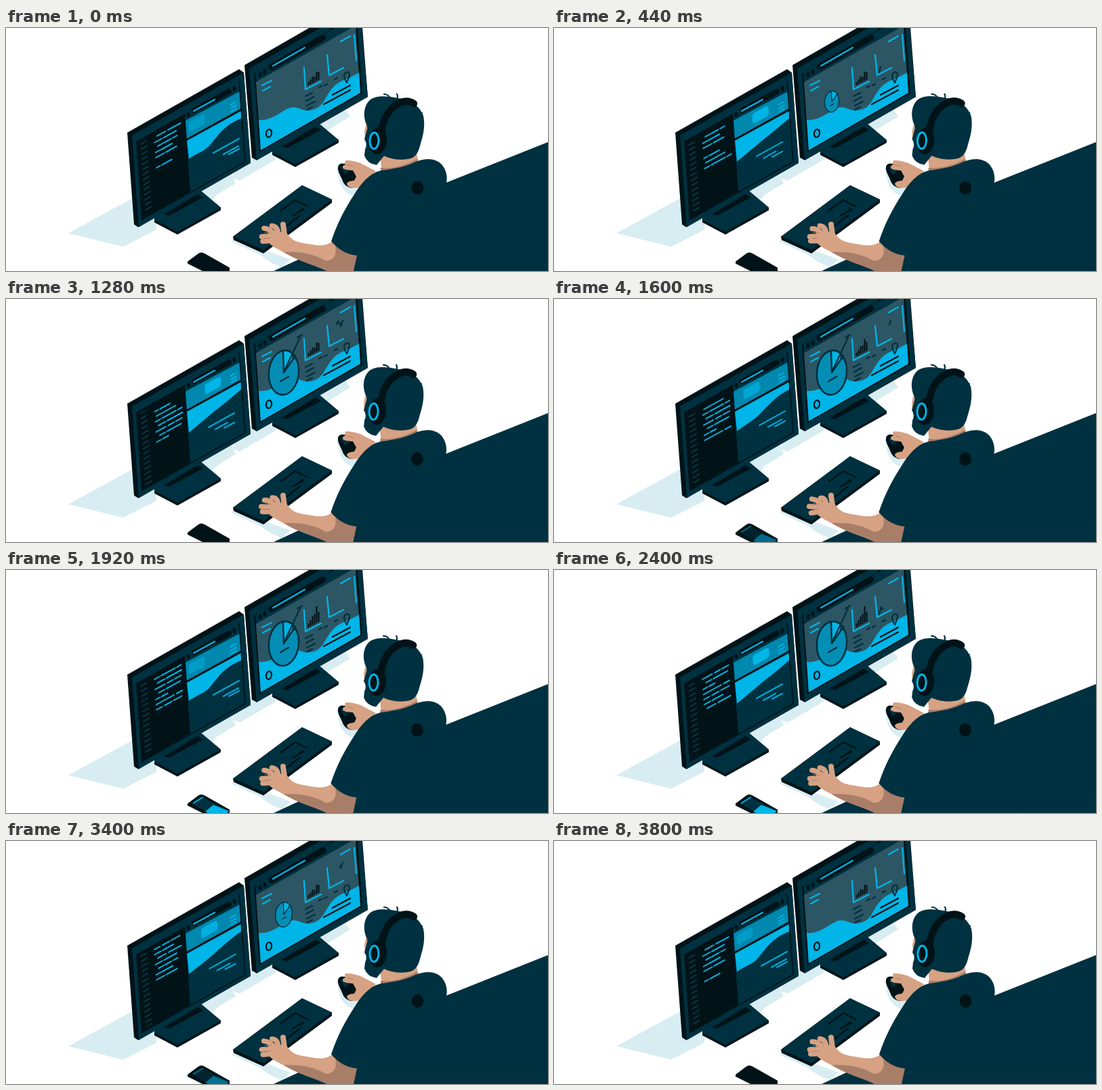
An HTML page with a canvas that plays this animation: 800x360 px, repeating every 3840 ms.

```html
<!DOCTYPE html>
<html lang="en">
<head>
<meta charset="utf-8">
<title>Developer at work</title>
<style>
html, body { margin: 0; width: 100%; height: 100%; overflow: hidden; background: #fff; }
canvas { display: block; }
</style>
</head>
<body>
<canvas id="stage" width="800" height="360"></canvas>
<script>
const ctx = document.getElementById('stage').getContext('2d');
const LOOP = 3840, HALF = LOOP / 2;
const NAVY = '#003140', INK = '#021318', CYAN = '#00b5e7', BLUE = '#0088ae',
      SLATE = '#2c5664', SHADOW = '#d8edf2', SKIN = '#d6a283', SHADE = '#a97e69', GUTTER = '#0a3947';

const lerp = (a, b, k) => a + (b - a) * k;
const ramp = (t, a, b) => {
  const k = Math.min(1, Math.max(0, (t - a) / (b - a)));
  return k * k * (3 - 2 * k);
};
const bump = (t, a, b, c, d) => ramp(t, a, b) - ramp(t, c, d);

// Piecewise linear value through [time, value] keys.
function track(t, keys) {
  if (t <= keys[0][0]) return keys[0][1];
  for (let i = 1; i < keys.length; i++) {
    const [a, x] = keys[i - 1], [b, y] = keys[i];
    if (t < b) return lerp(x, y, (t - a) / (b - a));
  }
  return keys[keys.length - 1][1];
}

function fill(color, d) {
  ctx.fillStyle = color;
  ctx.fill(new Path2D(d));
}
function stroke(color, width, d) {
  ctx.strokeStyle = color;
  ctx.lineWidth = width;
  ctx.stroke(new Path2D(d));
}
function oval(x, y, rx, ry, tilt = 0) {
  ctx.beginPath();
  ctx.ellipse(x, y, rx, ry, tilt, 0, Math.PI * 2);
}
function disc(color, x, y, rx, ry = rx, tilt = 0) {
  oval(x, y, rx, ry, tilt);
  ctx.fillStyle = color;
  ctx.fill();
}
function ring(color, width, x, y, rx, ry, tilt = 0) {
  oval(x, y, rx, ry, tilt);
  ctx.strokeStyle = color;
  ctx.lineWidth = width;
  ctx.stroke();
}
function group(draw, dx = 0, dy = 0) {
  ctx.save();
  ctx.translate(dx, dy);
  draw();
  ctx.restore();
}

function drawDesk() {
  fill(SHADOW, 'M92 304L187 252L222 272V299L173 324Z');
  fill(SHADOW, 'M283 235L330 212L339 230L311 247L300 262Z');
  fill(SHADOW, 'M333 222L350 190L400 165L398 195L345 226Z');
  fill(SHADOW, 'M456 140L497 115L508 131L474 152Z');
  fill(SHADOW, 'M332 316L340 311L385 330L420 343L408 354Q392 350 375 336Z');
  fill(NAVY, 'M395 360L492 315L640 233L800 169V360Z');
}

// The far edge runs on behind the monitor.
function drawStand(x, y) {
  group(() => {
    fill(INK, 'M0 0L60 -50L98 -18V-14L34 22L0 4Z');
    fill(NAVY, 'M0 0V-10L60 -50L98 -18L34 18Z');
    fill(INK, 'M14 -8L64 -38L72 -33L22 -6Z');
  }, x, y);
}

const codeRows = [
  [4, 12, 20, 18], [0, 10, 13, 18], [4, 7, 13, 10, 26, 6], [0, 6, 8, 16], [0, 12, 15, 15],
  [], [0, 5, 8, 14], [2, 28], [0, 7, 10, 20, 33, 6], [4, 10, 17, 22],
  [0, 14, 18, 8, 29, 9], [5, 8, 16, 20], [0, 6, 9, 8], [0, 26, 30, 8], [0, 8, 12, 10, 25, 12], [0, 9, 12, 15]
];

function drawCode(t) {
  const pitch = 7.5, total = codeRows.length * pitch, scroll = t / LOOP * total;
  ctx.save();
  ctx.transform(1, -.55, .07, 1, 219, 158);
  ctx.beginPath();
  ctx.rect(-2, 0, 46, 55);
  ctx.clip();
  codeRows.forEach((row, i) => {
    const y = (i * pitch + 4 - scroll + total) % total;
    for (let j = 0; j < row.length; j += 2)
      stroke(j % 4 ? CYAN : '#18a0c4', 2.3, `M${row[j]} ${y}h${row[j + 1]}`);
  });
  ctx.restore();

  ctx.save();
  ctx.transform(1, -.55, .07, 1, 199, 169);
  ctx.beginPath();
  ctx.rect(-2, 0, 14, 107);
  ctx.clip();
  for (let i = 0; i < 16; i++) stroke(GUTTER, 2, `M0 ${i * pitch + 3 - scroll % pitch}h8`);
  ctx.restore();
}

function drawSite(t) {
  const p = t % HALF, k = bump(p, 80, 480, 1330, 1820);
  const mix = (a, b) => lerp(a, b, k).toFixed(2);
  fill(NAVY, 'M264 122L344 77L353 197L272 242Z');
  stroke(INK, 8, 'M278 122L329 94');
  stroke(CYAN, 2.2, 'M277 123L308 106');
  disc(INK, 269, 128, 2.5, 3.5);
  disc(INK, 337, 90, 2.5, 4);
  fill(BLUE, 'M265 137L345 94L347 119L267 164Z');

  ctx.save();
  ctx.globalAlpha = lerp(.45, 1, k);
  ctx.transform(1, -.55, .06, 1, lerp(269, 293, k), lerp(140, 127, k));
  ctx.beginPath();
  ctx.roundRect(0, 0, 24, 15, 4);
  ctx.fillStyle = CYAN;
  ctx.fill();
  ctx.restore();

  stroke(CYAN, 1.8, 'M331 114l8 -4.5M332 119l8 -4.5M332 124l8 -4.5');
  fill(CYAN, `M267 167L347 123V134C${mix(322, 334)} ${mix(144, 145)} ${mix(315, 321)} ${mix(157, 156)} ${mix(303, 308)} ${mix(171, 166)}C${mix(294, 296)} ${mix(183, 176)} ${mix(285, 283)} ${mix(183, 187)} 270 ${mix(194, 198)}Z`);
  stroke(INK, 2.5, 'M267 165L347 121');
  stroke('#00a5d2', 2.2, `M${mix(306, 299)} ${mix(185, 190)}l38 -21M${mix(321, 309)} ${mix(187, 193)}l${mix(22, 18)} ${mix(-12, -10)}M${mix(329, 322)} ${mix(187, 191)}l15 -8`);
}

function drawLeftMonitor(t) {
  drawStand(219, 284);
  fill(INK, 'M179 155L344 61L351 66L361 200L195 295L189 291Z');
  fill(NAVY, 'M186 159L351 66L361 200L196 295Z');
  fill(INK, 'M192 168L264 127L272 242L200 284Z');
  drawCode(t);
  drawSite(t);
  stroke(INK, 1.5, 'M344 79L353 198L200 284');
}

function drawPie(t) {
  const size = bump(t, 150, 750, 3180, 3660);
  if (size > .01) {
    ctx.save();
    ctx.translate(410, 109);
    ctx.scale(size, size);
    disc('#058eb5', 0, 0, 22, 33, .1);
    fill(CYAN, 'M0 0L-1 -32Q9 -33 17 -25Z');
    ring(NAVY, 2.6, 0, 0, 22, 33, .1);
    stroke(NAVY, 2.5, 'M-1 -32L0 0L17 -25M-5 13L7 6');
    ctx.restore();
  }
  const reach = bump(t, 680, 1020, 2620, 3060);
  if (reach > .01) {
    stroke(NAVY, 2.3, `M410 108L${lerp(410, 434, reach)} ${lerp(108, 57, reach)}`);
    if (reach > .75) stroke(NAVY, 2.2, 'M430 57L437 53');
  }
  if (size > .8) ring(NAVY, 1.6, 425, 86, 2, 3);
}

function drawBars(t) {
  const k = bump(t, 1300, 1920, 2420, 2960);
  const low = [5, 7, 10, 8, 14, 12], high = [6, 9, 13, 15, 25, 15];
  ctx.lineCap = 'butt';
  low.forEach((h, i) => {
    stroke(INK, 2.1, `M${446.5 + i * 3} ${85 - i * 1.6}v${-lerp(h, high[i], k)}`);
  });
  ctx.lineCap = 'round';
}

function drawTrend(t) {
  const p = t % HALF;
  const head = track(p, [[400, 0], [480, 15], [560, 20], [880, 43], [1120, 55], [1280, 63]]);
  const tail = track(p, [[760, 0], [880, 5], [1120, 27], [1280, 41], [1720, 63]]);
  if (head - tail < .2) return;
  ctx.setLineDash([head - tail, 200]);
  ctx.lineDashOffset = -tail;
  stroke(NAVY, 2.3, 'M480 65L483 55L487 61L488.5 35L491 33L494 40L497 32');
  ctx.setLineDash([]);
}

function drawRightMonitor(t) {
  drawStand(393, 184);
  fill(INK, 'M352 55L449 -1H526L534 102L370 196L363 192Z');
  fill(NAVY, 'M359 60L464 0H525L534 102L370 196Z');
  fill(INK, 'M366 67L478 3V0H519L526 97L374 184Z');
  fill(NAVY, 'M368 66L485 0H516L517 2L370 84Z');
  stroke(INK, 9, 'M392 58L468 14');
  stroke(CYAN, 2.2, 'M394 56L441 29');
  disc(INK, 375, 69, 2.5, 3.8);
  disc(INK, 382, 65, 2.5, 3.8);
  fill(SLATE, 'M369 80L510 0H516L523 96L376 181Z');
  fill(CYAN, 'M373 136C392 138 403 125 417 119C431 114 435 124 449 122C469 119 470 102 481 90C491 77 506 76 521 66L523 96L376 181Z');
  stroke(CYAN, 2.2, 'M378 85L392 78M379 93L390 87M494 20L508 12M514 10L517 48');
  stroke(CYAN, 2.3, 'M440 59L442 91L465 79M474 40L477 70L498 59');
  stroke(NAVY, 2.4, 'M442 101l10 -5M443 108l11 -6M444 115l12 -6M444 121l8 -4');
  stroke(NAVY, 2.3, 'M462 88l4 -2M470 85l4 -2M485 76l4 -2');
  stroke(INK, 2.2, 'M482 99L508 85M469 113L508 92');
  ring(INK, 2.2, 388, 156, 4, 6, .15);
  drawBars(t);
  drawTrend(t);
  drawPie(t);
  stroke(NAVY, 2.2, 'M503 81C500 76 499 73 499 70C500 65 507 63 507 69C507 74 504 77 503 81Z');
}

function drawKeyboard() {
  fill(INK, 'M335 309L437 233L481 254V259L380 334L336 314Z');
  fill(NAVY, 'M336 309L437 233L481 254L380 329Z');
  stroke(INK, 2.5, 'M406 270L427 255L445 264M423 278L439 269M421 287L434 278M430 274L438 268M411 295L422 288');
}

function drawPhone(t) {
  fill(INK, 'M268 346L284 334Q288 331 293 334L330 355V360H290L268 349Z');
  const glow = bump(t, 1450, 1750, 3220, 3600);
  if (glow <= 0) return;
  ctx.globalAlpha = glow;
  fill(NAVY, 'M274 346L289 336L327 356L321 360H300Z');
  fill(CYAN, 'M294 358L306 348L329 357L326 360H298Z');
  stroke(CYAN, 2, 'M277 345L290 337');
  ctx.globalAlpha = 1;
}

function drawMouseHand(t) {
  const reach = bump(t, 440, 840, 900, 1250);
  fill(SHADOW, 'M488 208L493 230Q500 246 514 249L523 234L505 205Z');
  group(() => {
    fill(INK, 'M490 206C491 199 501 199 508 206C517 214 521 224 516 235C511 240 500 235 497 227C495 220 489 213 490 206Z');
    fill(NAVY, 'M494 207C497 203 503 207 507 212L500 217Z');
    fill(SKIN, 'M502 198C505 194 515 198 523 200L546 212L525 236L514 237Q505 237 503 231Q503 227 514 226L517 220L512 211L502 210Q497 208 500 204Z');
    stroke(SKIN, 6, 'M503 199L519 205M500 206L513 208');
    stroke(SHADE, 1, 'M504 203L512 205');
  }, 4 * reach, -reach);
}

function drawTypingArm(t) {
  fill(SKIN, 'M388 300L414 303C421 315 429 317 441 319C458 322 470 325 482 316L519 338L515 360H474C452 349 430 344 411 333C399 326 389 323 384 312Z');
  fill(SHADE, 'M410 332C436 331 455 335 472 345Q490 344 486 322L519 338L515 360H474C452 350 430 345 410 332Z');
  const tap = n => 1.1 * Math.sin(Math.PI * 2 * (t / 480 + n * .27));
  const tips = [[379, 316], [377, 308], [381, 297], [393, 294]];
  tips.forEach(([x, y], i) => stroke(SKIN, 7.5, `M${x + tap(i) * .5} ${y + tap(i)}Q${x + 10} ${y} 402 312`));
  stroke(SKIN, 8, 'M409 291L411 307L402 314');
  stroke(SHADE, 1, 'M382 303L391 304M381 312L390 311');
}

function drawBody() {
  fill(SKIN, 'M552 188L606 186L609 199L590 212L555 216Z');
  fill(SHADE, 'M553 207C572 209 590 203 607 194L609 202L580 216L553 215Z');
  fill(NAVY, 'M480 316C489 289 500 268 515 245C529 223 541 214 554 211C573 209 591 205 605 198C620 192 634 193 643 202C650 210 652 221 650 230L690 250V360H513L518 337Q496 335 480 316Z');
  disc(INK, 607.5, 237, 9, 10);
}

function drawHead() {
  fill(SKIN, 'M532 140L529 154L530 166L550 184L557 145Z');
  fill(NAVY, 'M529 165Q534 172 530 180L529 189Q533 201 547 203L560 187L545 150L533 150Z');
  fill(NAVY, 'M533 145C526 131 528 114 538 106C548 99 565 101 579 104C597 107 610 114 616 130C619 144 616 159 612 171C609 183 606 192 594 194C577 197 563 193 552 186L534 158Z');
  stroke(NAVY, 2.2, 'M567 104Q564 98 558 98M577 105Q579 101 577 98M604 123Q609 129 614 126');
  stroke(INK, 10.5, 'M554 156C556 133 567 115 586 109Q595 107 602 112');
  disc(INK, 549, 167, 13, 20, .1);
  ring(CYAN, 3, 543.5, 167, 6.5, 12, .03);
}

function render(t) {
  ctx.fillStyle = '#fff';
  ctx.fillRect(0, 0, 800, 360);
  ctx.lineCap = ctx.lineJoin = 'round';
  const sway = -.9 * bump(t, 0, 800, 2300, 3200);
  drawDesk();
  drawLeftMonitor(t);
  drawRightMonitor(t);
  drawKeyboard();
  drawPhone(t);
  drawMouseHand(t);
  drawTypingArm(t);
  group(drawBody, sway * .7);
  group(drawHead, sway, sway * .4);
}

const start = performance.now();
function tick(now) {
  render(Math.max(0, now - start) % LOOP);
  requestAnimationFrame(tick);
}
render(0);
requestAnimationFrame(tick);
</script>
</body>
</html>
```
